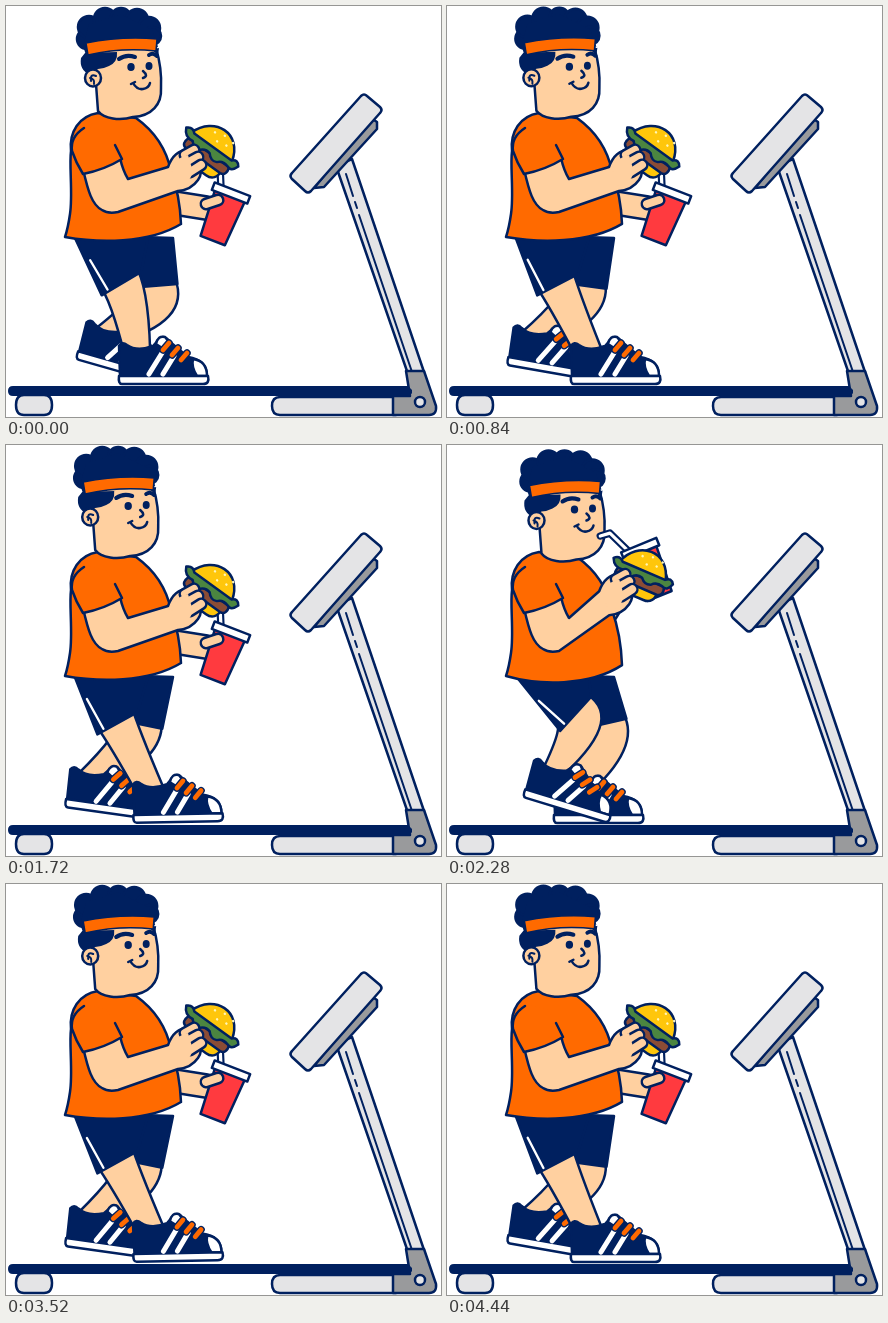
An HTML page with a canvas for the animation above (4.48 s loop, 435 by 411 pixels).

```html
<!DOCTYPE html>
<html lang="en">
<head>
<meta charset="utf-8">
<title>Treadmill snack</title>
<style>
html, body { margin: 0; width: 100%; height: 100%; overflow: hidden; background: #fff; }
canvas { display: block; }
</style>
</head>
<body>
<canvas id="stage" width="435" height="411"></canvas>
<script>
const ctx = document.getElementById('stage').getContext('2d');
const NAVY = '#00205f', ORANGE = '#ff6a00', SKIN = '#ffd0a0', LIGHT = '#e4e4e6',
  GREY = '#999a9c', YELLOW = '#ffc60b', GREEN = '#4b8540', BROWN = '#8b4c35', RED = '#ff3a3f';
const LOOP = 4480, STEP = 40, STRIDE = 900;

ctx.lineJoin = ctx.lineCap = 'round';

// Shape helpers
function shape(d, fill, stroke = NAVY, width = 2.5) {
  const path = new Path2D(d);
  if (fill) { ctx.fillStyle = fill; ctx.fill(path); }
  if (stroke) { ctx.strokeStyle = stroke; ctx.lineWidth = width; ctx.stroke(path); }
}
const line = (d, color = NAVY, width = 2.5) => shape(d, null, color, width);
const poly = pts => 'M' + pts.map(p => p.join(' ')).join('L') + 'Z';
function dot(x, y, rx, ry, fill, stroke = null) {
  shape(`M${x - rx} ${y}a${rx} ${ry} 0 1 0 ${2 * rx} 0a${rx} ${ry} 0 1 0 ${-2 * rx} 0Z`, fill, stroke);
}
function capsule(d, width) {
  line(d, NAVY, width + 5);
  line(d, SKIN, width);
}
function placed(x, y, degrees, draw) {
  ctx.save();
  ctx.translate(x, y);
  ctx.rotate(degrees * Math.PI / 180);
  draw();
  ctx.restore();
}

// Motion helpers
const mix = (a, b, s) => a + (b - a) * s;
const clamp = x => Math.min(1, Math.max(0, x));
const ease = x => (1 - Math.cos(Math.PI * clamp(x))) / 2;

// Smooth closed curve through rows of [time, ...values]
function cycle(keys, period, t) {
  t = (t % period + period) % period;
  const n = keys.length;
  const at = i => {
    const k = Math.floor(i / n), row = keys[i - k * n];
    return [row[0] + k * period, ...row.slice(1)];
  };
  let i = n - 1;
  while (keys[i][0] > t) i--;
  const [a, b, c, d] = [at(i - 1), at(i), at(i + 1), at(i + 2)];
  const h = c[0] - b[0], u = (t - b[0]) / h;
  return b.slice(1).map((v, j) => {
    j++;
    const m0 = (c[j] - a[j]) / (c[0] - a[0]) * h, m1 = (d[j] - b[j]) / (d[0] - b[0]) * h;
    return v + u * m0 + u * u * (3 * (c[j] - v) - 2 * m0 - m1) + u * u * u * (2 * (v - c[j]) + m0 + m1);
  });
}

// Phase, heel x, heel y, tilt
const STEPS = [
  [0, 113, 378, 0], [100, 93, 378, 0], [200, 76, 378, 0], [300, 63, 373, 3],
  [370, 59, 362, 8], [390, 60, 359, 10], [450, 70, 353, 16], [480, 76, 352, 17],
  [550, 104, 364, 8], [640, 126, 367, 0], [720, 137, 372, -7], [780, 134, 377, -4],
  [840, 124, 378, 0]
];
// Phase, head x, head y
const BOB = [
  [0, 0, 0], [30, 2.5, 3.5], [100, 3, 5], [220, 2, 3.5], [300, -1, 1], [370, -2.8, 0], [400, -2.3, -.3]
];

function treadmill() {
  shape('M18 389H38Q46 389 46 399T38 409H18Q10 409 10 399T18 389Z', LIGHT);
  shape('M274 391H390V409H274Q266 409 266 400T274 391Z', LIGHT);
  shape('M330 160L346 153L418 366L402 368Z', LIGHT);
  line('M340 168L347 190M349 196L351 202M353 209L406 366', NAVY, 2);
  shape('M365 112L371 116L371 123L318 181L308 182Z', GREY);
  shape('M355 90Q358 87 361 90L374 101Q377 104 374 107L305 185Q302 188 299 185L286 173Q283 170 286 167Z', LIGHT);
  shape('M400 365H418L430 400Q431 409 423 409H387V390H404Z', GREY);
  dot(414, 396, 5, 5, LIGHT, NAVY);
  shape('M7 380H402L406 384Q407 390 400 390H7Q2 390 2 385T7 380Z', NAVY, null);
}

function shoe() {
  shape('M1 -8L0 -38Q3 -43 8 -39Q18 -32 34 -38L41 -46Q46 -49 50 -43L69 -27Q88 -24 88 -8Z', NAVY);
  shape('M74 -25Q88 -23 88 -8L78 -8Q72 -17 74 -25Z', '#fff');
  shape('M0 -8H89Q91 0 84 0H3Q-1 0 0 -8Z', '#fff');
  line('M30 -10L43 -31M44 -10L55 -28', '#fff', 5);
  shape('M37 -40Q39 -49 46 -47L50 -42L43 -36Z', '#fff');
  const laces = 'M44 -34L50 -41M53 -29L59 -36M62 -24L68 -31';
  line(laces, NAVY, 7.5);
  line(laces, ORANGE, 4.8);
}

function leg(hipX, bone, phase, near) {
  const hipY = 238;
  const [fx, fy, tilt] = cycle(STEPS, STRIDE, phase);
  const r = tilt * Math.PI / 180, c = Math.cos(r), s = Math.sin(r);
  const ax = fx + 19 * c + 37 * s, ay = fy + 19 * s - 37 * c;
  const dx = ax - hipX, dy = ay - hipY, dist = Math.hypot(dx, dy);
  const nx = dy / dist, ny = -dx / dist;
  const out = Math.sqrt(Math.max(0, bone * bone - dist * dist / 4));
  const kx = hipX + dx / 2 + out * nx, ky = hipY + dy / 2 + out * ny;
  const len = Math.hypot(kx - hipX, ky - hipY);
  const ux = (kx - hipX) / len, uy = (ky - hipY) / len;
  // Point along the thigh, then sideways from it
  const thigh = (along, side) => [hipX + ux * along + uy * side, hipY + uy * along - ux * side];
  const shin = side => [ax + nx * side, ay + 8 + ny * side];
  const knee = (side, bulge) => [kx + nx * (side + out * bulge), ky + ny * (side + out * bulge)];
  const hem = near ? 46 : 42;

  shape(`M${thigh(36, -20)}Q${knee(-17, 0)} ${shin(-13)}L${shin(13)}Q${knee(16, .8)} ${thigh(36, 21)}Z`, SKIN);
  placed(fx, fy, tilt, shoe);
  const [left, right] = near ? [68, 142] : [104, 167];
  shape(poly([[left, 230], thigh(hem, -23), thigh(hem, 23), [right, 232]]), NAVY);
  if (near) line(`M${thigh(10, -15)}L${thigh(hem - 2, -15)}`, '#fff', 2.4);
}

function shirt(sag) {
  shape('M92 107C73 110 63 126 65 145C63 160 67 188 64 208Q62 222 59 231' +
    `C92 ${237 + sag} 142 ${238 + sag} 175 ${218 + sag * .6}Q174 190 165 165Q158 132 130 112Z`, ORANGE);
}

function head(sip) {
  shape('M90 78L92 105C98 113 114 115 127 111C146 110 156 98 155 82Q156 62 150 42L86 44Z', SKIN);
  shape('M79 47L111 46Q112 56 103 60Q97 63 92 63L84 69Q73 64 75 52ZM146 44L153 42L152 49Z', NAVY, null);
  dot(87, 72, 8, 8.5, SKIN, NAVY);
  line('M90 70Q84 67 85 75M84 72Q89 73 88 78', NAVY, 2);
  for (const [x, y, r] of [[81, 33, 10], [83, 21, 11], [99, 13, 11], [115, 12, 10], [131, 14, 11], [143, 22, 11], [146, 30, 9]])
    dot(x, y, r, r, NAVY, NAVY);
  shape('M77 40L83 18L115 8L146 24L152 41Q115 38 80 49Z', NAVY, null);
  shape('M80 37Q115 30 151 33L150 45Q116 41 82 49Z', ORANGE, NAVY, 1.5);
  line('M113 53Q120 48 129 51M143 49Q147 46 151 50', NAVY, 4);
  dot(125, 61, 3.7, 4.1, NAVY);
  dot(143, 60, 3.5, 4.1, NAVY);
  line('M137 65Q143 70 137 72');
  if (sip) line('M133 80Q137 76 142 80M130 85Q133 89 138 87');
  else line('M127 77Q131 84 137 83Q143 82 144 77M125 78L129 76');
}

function cup() {
  const straw = 'M-12 -3L-22 -26L-32 -27';
  line(straw, NAVY, 7.5);
  line(straw, '#fff', 3.2);
  shape('M-16 3H16L13 51H-13Z', RED);
  shape('M-19 -4H19V4H-19Z', '#fff');
}

function burger() {
  shape('M-20 11H22Q23 25 12 25H-10Q-21 25 -20 11Z', YELLOW);
  shape('M-24 5H26Q29 14 22 15H-20Q-27 14 -24 5Z', BROWN);
  shape('M-25 -1C-16 -28 17 -31 25 -1Z', YELLOW);
  shape('M-32 -2Q-27 -7 -22 -2H24Q29 -7 33 -1Q30 8 24 5Q17 3 13 8Q7 11 2 5Q-4 3 -9 9Q-15 10 -19 5Q-28 7 -32 -2Z', GREEN);
  line('M-6 -15h.1M4 -18h.1M11 -11h.1M1 -9h.1M15 -17h.1', '#fff6b8', 2.4);
}

function nearArm(dx, dy) {
  const p = (x, y) => `${x + dx} ${y + dy}`;
  shape(`M77 163C82 185 86 199 96 204Q102 208 112 206L${p(170, 187)}Q${p(183, 186)} ${p(190, 176)}` +
    `C${p(197, 166)} ${p(191, 151)} ${p(180, 146)}C${p(171, 146)} ${p(164, 152)} ${p(160, 163)}` +
    'L122 173Q117 165 114 152Z', SKIN);
  capsule(`M${p(177, 151)}L${p(186, 146)}`, 8);
  capsule(`M${p(179, 159)}L${p(190, 153)}`, 8);
  capsule(`M${p(182, 168)}L${p(193, 161)}`, 8);
  shape(`M${p(163, 165)}Q${p(170, 152)} ${p(180, 151)}L${p(185, 168)}Q${p(180, 182)} ${p(170, 184)}Z`, SKIN, null);
  shape('M80 120Q65 128 66 143Q70 156 77 168Q98 164 116 153L109 139L100 125Z', ORANGE, null);
  line('M78 122Q64 131 66 145Q70 157 77 168Q98 164 116 153L109 139');
}

function render(t) {
  const phase = t % STRIDE;
  const [hx, hy] = cycle(BOB, STRIDE / 2, phase);
  const raise = ease((t - 1800) / 600) * (1 - ease((t - 3000) / 450));
  const arc = 30 * Math.sin(Math.PI * raise);
  const lift = Math.sin(Math.PI * clamp((t - 1900) / 700)) ** 2;
  const handX = mix(200, 168, raise) + arc, handY = mix(202, 126, raise);

  ctx.fillStyle = '#fff';
  ctx.fillRect(0, 0, 435, 411);
  treadmill();
  capsule(`M${mix(150, 160, raise)} ${mix(194, 164, raise)}L${handX} ${handY}`, 21);
  leg(145 + hx, 58, phase + STRIDE / 2, false);
  leg(92 + hx, 56, phase, true);
  shirt(hy);
  placed(hx, hy, 0, () => head(raise > .95));
  placed(mix(225, 180, raise) + arc, mix(187, 95, raise), mix(21, -27, raise), cup);
  capsule(`M${handX} ${handY - 4}L${handX + mix(12, 9, raise)} ${handY - mix(8, 15, raise)}`, 8);
  placed(205 - 10 * lift, 142 - 15 * lift, 36 - 13 * lift, burger);
  nearArm(2 - 10 * lift, -2 - 15 * lift);
}

const start = performance.now();
function tick() {
  const t = (performance.now() - start) % LOOP;
  render(Math.floor(t / STEP) * STEP);
  requestAnimationFrame(tick);
}
tick();
</script>
</body>
</html>
```
